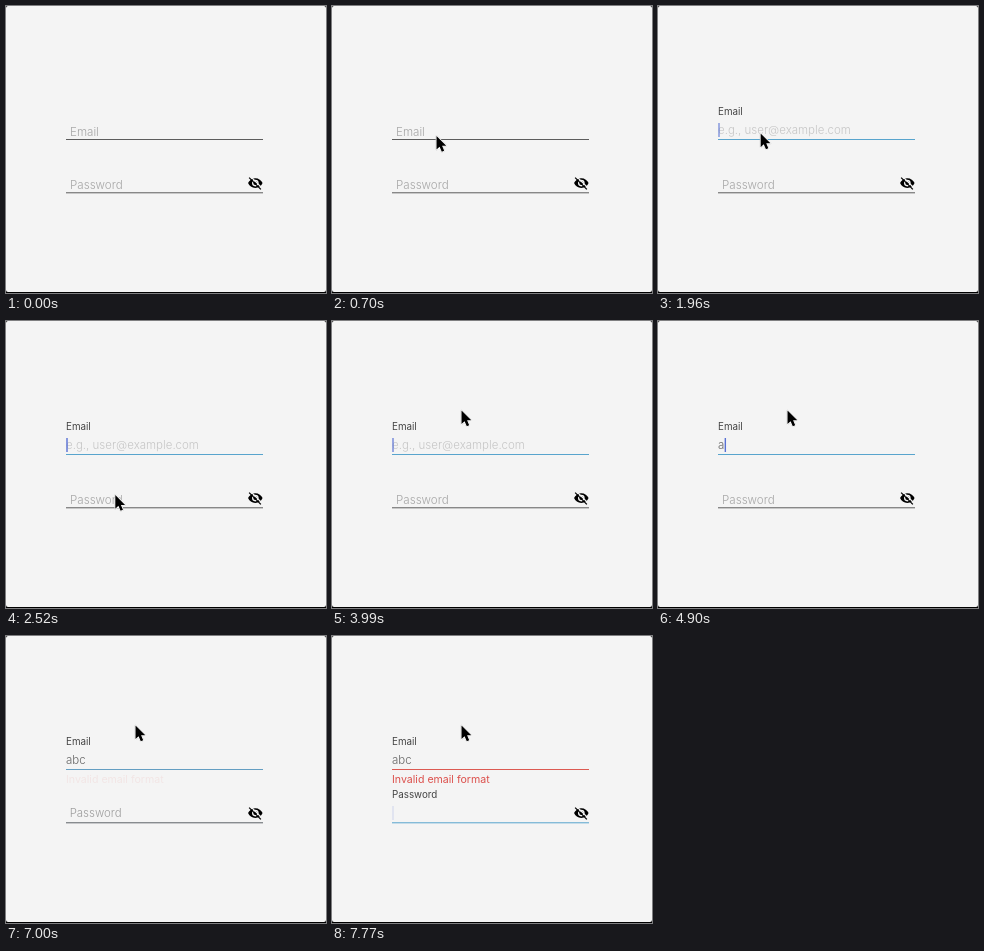
Recreate the animation shown at these times as an HTML page. Size 320x287 px, loop 8000 ms.

```html
<!DOCTYPE html>
<html lang="en">
<head>
<meta charset="utf-8">
<title>Login form</title>
<style>
  html, body { margin: 0; width: 100%; height: 100%; overflow: hidden; background: #000; }
  svg { display: block; width: 100vw; height: 100vh; }
  text { font: 300 11.5px Inter, "Open Sans", sans-serif; white-space: pre; }
</style>
</head>
<body>
<svg viewBox="0 0 320 287">
  <rect width="320" height="286" rx="2" fill="#f4f4f4"/>

  <text id="hint" x="60" y="127.8" fill="#c6c6c6">e.g., user@example.com</text>
  <text id="typed" x="60" y="127.8" fill="#666"></text>
  <text id="emailLabel">Email</text>
  <rect id="emailLine" x="60" y="133" width="197" height="1"/>

  <text id="error" x="60" y="146.8" fill="#dc504c" style="font-size:10.6px;font-weight:400">Invalid email format</text>

  <text id="passLabel">Password</text>
  <rect id="passLine" x="60" y="186.3" width="197" height="1"/>

  <g transform="translate(241.4 169.2) scale(.66)">
    <path d="M1 12C2.7 7.6 7 4.5 12 4.5s9.3 3.1 11 7.5c-1.7 4.4-6 7.5-11 7.5S2.7 16.4 1 12z"/>
    <circle cx="12" cy="12" r="5" fill="#f4f4f4"/>
    <circle cx="12" cy="12" r="3"/>
    <path d="M4 1.2L22 19.2" stroke="#f4f4f4" stroke-width="1.9"/>
    <path d="M2.6 3.6L20.4 21.4" stroke="#000" stroke-width="1.9"/>
  </g>

  <rect id="caret" width="1.4" height="14" fill="#5870d4"/>
  <circle id="ring" cx="103" cy="128" r="20"/>
  <g id="pointer">
    <path d="M0 0v13.6l3.1-2.9 2.2 5 2.4-1-2.1-4.9h4.2z" fill="#000"
      stroke="#fff" stroke-width="1.6" stroke-linejoin="round" paint-order="stroke"
      style="filter:drop-shadow(0 .7px .6px #0005)"/>
  </g>
</svg>
<script>
const LOOP = 8000, STEP = 70, LAST = 7770;
const EMAIL_FOCUS = 1270, TAB = 6960;
const KEYS = [4900, 5180, 5390];

// time, x, y of the pointer tip
const PATH = [
  [70, 140, 220], [700, 104.5, 130], [840, 103, 127], [1900, 102.5, 126.5],
  [2590, 109.5, 175.5], [2740, 109.5, 175.5], [3080, 129.5, 89.5]
];

const $ = id => document.getElementById(id);
const set = (id, attrs) => {
  for (const k in attrs) $(id).setAttribute(k, attrs[k]);
};
const mix = (a, b, p) => a + (b - a) * p;
const ramp = (t, from, to) => Math.min(1, Math.max(0, (t - from) / (to - from)));
const ease = p => p * p * (3 - 2 * p);
const blend = (a, b, p) => `rgb(${a.map((v, i) => Math.round(mix(v, b[i], p)))})`;

const GREY = [92, 92, 92], BLUE = [88, 164, 205], RED = [220, 90, 82];
const PALE = [166, 166, 166], DARK = [68, 68, 68];

function floatLabel(id, baseline, p) {
  set(id, { x: mix(64, 60, p), y: mix(baseline, baseline - 21, p), fill: blend(PALE, DARK, p) });
  $(id).style.fontSize = mix(11.6, 9.8, p) + "px";
  $(id).style.fontWeight = mix(300, 400, p);
}

function blink(age) {
  const phase = Math.max(0, age) % 1020;
  return 1 - ramp(phase, 480, 600) + ramp(phase, 990, 1020);
}

function drawPointer(t) {
  let i = 0;
  while (i < PATH.length - 2 && t > PATH[i + 1][0]) i++;
  const [t0, x0, y0] = PATH[i], [t1, x1, y1] = PATH[i + 1];
  const p = ease(ramp(t, t0, t1));
  set("pointer", {
    transform: `translate(${mix(x0, x1, p)} ${mix(y0, y1, p)})`,
    opacity: t < 70 ? 0 : 1
  });
  set("ring", { "fill-opacity": t < 840 || t >= 1190 ? 0 : mix(.03, .08, ramp(t, 840, 1050)) });
}

function drawCaret(t) {
  const inPassword = t >= 7140;
  const typing = t >= KEYS[0];
  const start = inPassword ? 7190 : typing ? 5520 : 1450;
  set("caret", {
    x: inPassword || !typing ? 60.3 : 60.3 + $("typed").getComputedTextLength(),
    y: inPassword ? 170 : 117,
    opacity: t < 1400 || (t >= 7000 && !inPassword) ? 0 : blink(t - start)
  });
}

function render(t) {
  const email = ease(ramp(t, EMAIL_FOCUS, 1400));
  const pass = ease(ramp(t, TAB, 7180));
  const count = KEYS.filter(k => t >= k).length;

  $("typed").textContent = "abc".slice(0, count);
  set("hint", { opacity: count ? 0 : email });
  set("error", { opacity: pass });
  floatLabel("emailLabel", 129.6, email);
  floatLabel("passLabel", 183, pass);
  set("emailLine", { fill: pass ? blend(BLUE, RED, pass) : blend(GREY, BLUE, email) });
  set("passLine", { fill: blend(GREY, BLUE, pass) });
  drawCaret(t);
  drawPointer(t);
}

function tick() {
  const t = performance.now() % LOOP;
  render(Math.min(LAST, Math.floor(t / STEP) * STEP));
  requestAnimationFrame(tick);
}
tick();
</script>
</body>
</html>
```
